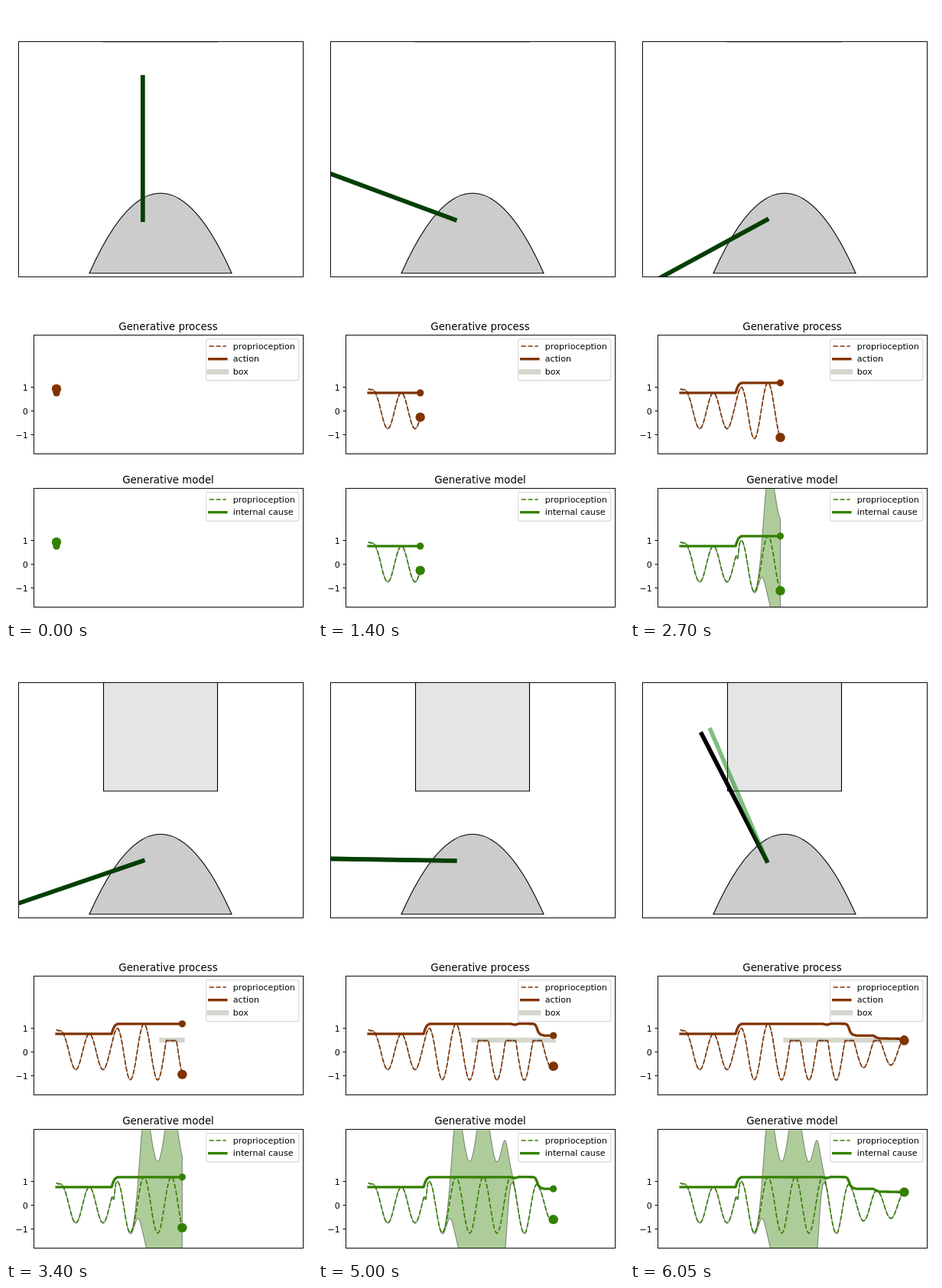
An HTML page for the animation above (6.1 s loop, 400 by 800 pixels).

```html
<!DOCTYPE html>
<html lang="en">
<head>
<meta charset="utf-8">
<title>Arm, process and model</title>
<style>
  html, body { margin: 0; width: 100%; height: 100%; overflow: hidden; background: #fff; }
  svg { display: block; width: 400px; height: 800px; }
  text { font: 11.11px "DejaVu Sans", sans-serif; }
  .title { font-size: 13.33px; text-anchor: middle; }
  .tick { text-anchor: end; }
  .spine { fill: none; stroke: #000; stroke-width: .95; }
  .shape { stroke: #000; stroke-width: 1.11; }
  .arm { stroke-width: 5.56; stroke-linecap: square; }
  .dash { fill: none; stroke-width: 1.67; stroke-dasharray: 6.17 2.67; }
  .solid { fill: none; stroke-width: 3.33; stroke-linecap: square; stroke-linejoin: round; }
  .box { fill: none; stroke: #d5d5cc; stroke-width: 6.67; stroke-linecap: square; }
  .band { stroke: #000; stroke-opacity: .4; stroke-width: 1.11; fill-opacity: .4; }
  .legend { fill: #fff; fill-opacity: .8; stroke: #ccc; stroke-opacity: .8; stroke-width: 1.11; }
</style>
</head>
<body>
<svg id="stage" viewBox="0 0 400 800"></svg>
<script>
const stage = document.getElementById('stage');
const FRAME_MS = 50, FRAMES = 122;
const X0 = 66, X_STEP = 2.417, UNIT = 31.1;
const PERIOD = 35.7, PEAK_X = 109;
const BOX_FRAME = 57, BOX_X = X0 + BOX_FRAME * X_STEP, BOX_LEVEL = 0.49, CONTACT = 0.47;
const PIVOT = { x: 178.75, y: 279, length: 186 };

function add(tag, attrs, parent = stage) {
  const node = document.createElementNS('http://www.w3.org/2000/svg', tag);
  for (const key in attrs) node.setAttribute(key, attrs[key]);
  parent.appendChild(node);
  return node;
}

function label(content, x, y, className = '') {
  add('text', { x, y, class: className }).textContent = content;
}

function clip(id, x, y, width, height) {
  add('rect', { x, y, width, height }, add('clipPath', { id }));
  return add('g', { 'clip-path': `url(#${id})` });
}

// Piecewise linear interpolation through [x, value] points.
function lerpPoints(points, x) {
  if (x <= points[0][0]) return points[0][1];
  for (let i = 1; i < points.length; i++) {
    const [xa, a] = points[i - 1], [xb, b] = points[i];
    if (x <= xb) return a + (b - a) * (x - xa) / (xb - xa);
  }
  return points[points.length - 1][1];
}

const ACTION = [[138, .75], [140, .95], [142, 1.08], [145, 1.16], [148, 1.17], [252, 1.17],
  [257.5, 1.13], [263, 1.18], [282, 1.17], [284, 1.13], [286, 1], [288, .82], [291, .72],
  [296, .68], [318, .68], [322, .6], [326, .56], [358, .54]];
const AMPLITUDE = [[138, .75], [146, 1.01], [156, 1.17], [262, 1.19], [272, 1.19], [280, 1.1],
  [286, .9], [291, .72], [300, .67], [318, .66], [326, .58], [358, .54]];
const ONSET = [[66, .92], [68.5, .88], [71, .89], [73.5, .84], [75.5, .73], [77, .597]];

const sigmoid = z => 1 / (1 + Math.exp(-z));
const action = x => lerpPoints(ACTION, x);

function swing(x) {
  if (x < 77) return lerpPoints(ONSET, x);
  return lerpPoints(AMPLITUDE, x) * Math.cos(2 * Math.PI * (x - PEAK_X) / PERIOD);
}

const sensed = x => x > BOX_X ? Math.min(swing(x), CONTACT) : swing(x);
const predicted = x => swing(x) - 0.42 * Math.exp(-(((x - 141) / 1.5) ** 2));
const spread = x => 3 * sigmoid((x - 175.5) / 2.8) * sigmoid((247.5 - x) / 2.3);

function trace(valueAt, zeroY, from, to) {
  const points = [];
  const put = x => points.push(`${x.toFixed(2)},${(zeroY - valueAt(x) * UNIT).toFixed(2)}`);
  for (let x = from; x < to; x += 0.5) put(x);
  put(to);
  return points;
}

const toPath = points => 'M' + points.join('L');

// Arena
const arena = clip('arena', 16.5, 46.5, 372, 307);
const block = add('path', { class: 'shape', fill: '#e5e5e5' }, arena);
add('path', { class: 'shape', fill: '#ccc', d: 'M109 348.8Q202 139.8 295 348.8Z' }, arena);
const realArm = add('line', { class: 'arm', stroke: '#000' }, arena);
const modelArm = add('line', { class: 'arm', stroke: '#008000', 'stroke-opacity': .5 }, arena);
add('rect', { class: 'spine', x: 16.5, y: 46.5, width: 372, height: 307 });

function aim(arm, angle) {
  arm.setAttribute('x1', PIVOT.x);
  arm.setAttribute('y1', PIVOT.y);
  arm.setAttribute('x2', PIVOT.x - PIVOT.length * Math.sin(angle));
  arm.setAttribute('y2', PIVOT.y - PIVOT.length * Math.cos(angle));
}

function makeChart({ id, top, title, color, valueAt, widthAt, rows }) {
  const zeroY = top + 98.7;
  const plot = clip(id, 36.5, top, 352, 155);
  const boxLine = add('path', { class: 'box' }, plot);
  const band = add('path', { class: 'band', fill: color }, plot);
  const dashed = add('path', { class: 'dash', stroke: color }, plot);
  const solid = add('path', { class: 'solid', stroke: color }, plot);
  const bigDot = add('circle', { r: 6.2, fill: color }, plot);
  const smallDot = add('circle', { r: 4.6, fill: color }, plot);

  add('rect', { class: 'spine', x: 36.5, y: top, width: 352, height: 155 });
  label(title, 212, top - 6.5, 'title');
  for (const value of [1, 0, -1]) {
    const y = Math.round(zeroY - value * UNIT - 0.5) + 0.5;
    add('path', { class: 'spine', d: `M32.5 ${y}H36.5` });
    label(String(value).replace('-', '\u2212'), 28.9, y + 4, 'tick');
  }

  add('rect', { class: 'legend', x: 261.7, y: top + 5, width: 121, height: 4.6 + 16.5 * rows.length, rx: 2.2 });
  rows.forEach(([kind, name], i) => {
    const y = top + 14.5 + 16.7 * i;
    const sample = add('path', { class: kind, d: `M265.7 ${y}H287.9` });
    if (kind !== 'box') sample.setAttribute('stroke', color);
    label(name, 296.8, y + 3.7);
  });

  return function update(frame, x) {
    const single = frame === 0;
    const curve = trace(valueAt, zeroY, X0, x);
    dashed.setAttribute('d', single ? '' : toPath(curve));
    solid.setAttribute('d', single ? '' : toPath(trace(action, zeroY, X0, x)));
    let outline = '';
    if (!single) {
      const upper = trace(t => valueAt(t) + widthAt(t), zeroY, X0, x);
      const lower = trace(t => valueAt(t) - widthAt(t), zeroY, X0, x);
      outline = toPath(upper.concat(lower.reverse())) + 'Z';
    }
    band.setAttribute('d', outline);
    const showBox = id === 'process' && frame >= BOX_FRAME;
    const boxY = zeroY - BOX_LEVEL * UNIT;
    boxLine.setAttribute('d', showBox ? `M${BOX_X} ${boxY}H${x + 0.01}` : '');
    for (const [dot, value] of [[bigDot, valueAt(x)], [smallDot, action(x)]]) {
      dot.setAttribute('cx', x);
      dot.setAttribute('cy', zeroY - value * UNIT);
    }
  };
}

const charts = [
  makeChart({
    id: 'process', top: 429.5, title: 'Generative process', color: '#803300',
    valueAt: sensed, widthAt: () => 0.01,
    rows: [['dash', 'proprioception'], ['solid', 'action'], ['box', 'box']]
  }),
  makeChart({
    id: 'model', top: 629.5, title: 'Generative model', color: '#338000',
    valueAt: predicted, widthAt: x => 0.01 + spread(x),
    rows: [['dash', 'proprioception'], ['solid', 'internal cause']]
  })
];

function draw(frame) {
  const x = X0 + frame * X_STEP;
  const angle = value => frame ? 0.945 - value : 0;
  aim(realArm, angle(sensed(x)));
  aim(modelArm, angle(predicted(x)));
  block.setAttribute('d', `M127.5 46.5H276.5V${frame >= BOX_FRAME ? 188 : 46.6}H127.5Z`);
  charts.forEach(update => update(frame, x));
}

const start = performance.now();
let shown = -1;
function tick() {
  const frame = Math.floor((performance.now() - start) / FRAME_MS) % FRAMES;
  if (frame !== shown) draw(shown = frame);
  requestAnimationFrame(tick);
}
tick();
</script>
</body>
</html>
```
